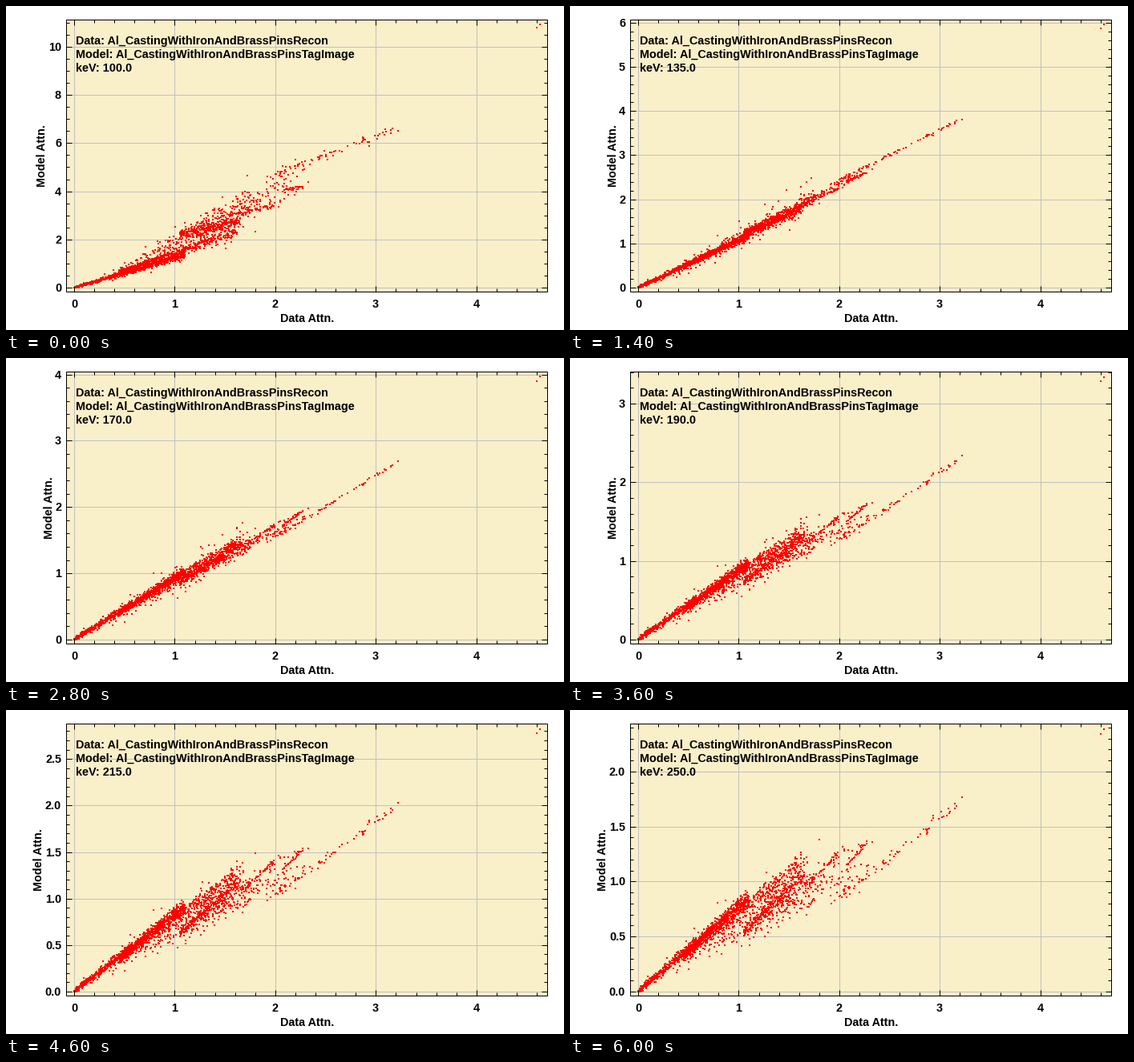
Write a matplotlib script that moves like this. It is 696 px wide and 405 px high and loops after 6200 ms.

```python
import numpy as np
import matplotlib.pyplot as plt
from matplotlib.animation import FuncAnimation
from matplotlib.collections import LineCollection
from matplotlib.patches import Rectangle

W, H, DPI = 696, 405, 100
PX = 72 / DPI
LEFT, RIGHT, TOP, BOTTOM = 75.5, 675.5, 17.5, 357.5
X0, Y0, XSCALE, PEAK_RISE = 85, 352, 125.45, 330
FRAMES, INTERVAL = 31, 200
E_MIN, E_STEP, E_MAX = 100, 5, 250

plt.rcParams["font.family"] = "Liberation Sans"
plt.rcParams["font.weight"] = "bold"

# Attenuation falls with energy: a power law for the light metal,
# a smooth log-log curve through key points for the heavy one.
peak_fit = np.polyfit(np.log([100, 135, 190, 250]),
                      np.log([10.963, 5.98, 3.356, 2.4]), 3)


def peak(e):
    return np.exp(np.polyval(peak_fit, np.log(e)))


def heavy(e):
    return peak(e) / peak(E_MAX)


def light(e):
    return (E_MAX / e) ** 0.457


def make_points():
    """Return x, value at E_MIN and value at E_MAX of every dot."""
    rng = np.random.default_rng(4)

    def draw(n, start, length, power=1.0):
        return start + length * rng.random(n) ** power

    casting = draw(800, 0, 1.1)
    mixed = draw(560, 0.45, 1.17, 1.5)
    cloud = np.clip(rng.normal(1.35, 0.42, 440), 0.3, 2.4)
    arc = draw(75, 2.05, 1.19, 1.6)
    strands = [
        (casting, rng.normal(1.22, 0.05, casting.size)),
        (mixed, rng.normal(1.43, 0.07, mixed.size)),
        (cloud, rng.normal(1.70 + 0.16 * cloud, 0.2)),
        (arc, rng.normal(2.32 - 0.24 * (arc - 2.05), 0.04)),
        (np.array([4.60, 4.63]), np.full(2, 2.367)),
    ]
    # Each pin adds a fixed thickness, so its dots climb gently.
    pins = [(1.05, 0.60, 2.2), (1.65, 0.35, 3.1), (2.05, 0.23, 4.0)]
    for k, (start, length, rise) in enumerate(pins):
        x = draw(int(230 / (k + 1) ** 2), start, length)
        strands.append((x, (rise + 0.9 * (x - start)) / x
                        + rng.normal(0, 0.06 / (k + 1), x.size)))

    x, p = np.hstack(strands)
    p = np.clip(p, 1.12, 2.42)
    q = 0.79 - 0.31 * (p - 1.2) + 0.0128 * np.maximum(x - 2, 0) ** 2

    stray = rng.random(x.size) < 0.09
    noise = np.where(x > 1.75, 0.004, np.where(stray, 0.13, 0.018))
    gain = 1 + rng.normal(0, noise)
    shift = rng.normal(0, 0.018, x.size) * (x < 1.75)
    return x, x * p * gain + 1.5 * shift, x * q * gain + shift


xs, lo, hi = make_points()
heavy_part = (lo - light(E_MIN) * hi) / (heavy(E_MIN) - light(E_MIN))
light_part = hi - heavy_part


def model(e):
    return np.maximum(light_part * light(e) + heavy_part * heavy(e), 0)


def nice_step(span):
    raw = span / 6.3
    base = 10 ** np.floor(np.log10(raw))
    return next(m * base for m in (1, 2, 5, 10) if raw <= m * base)


def crisp(v):
    return np.floor(v + 0.5) + 0.5


def h_ticks(ys, size):
    return [s for y in ys for s in ([(LEFT, y), (LEFT + size, y)],
                                    [(RIGHT - size, y), (RIGHT, y)])]


def v_ticks(cols, size):
    return [s for x in cols for s in ([(x, TOP), (x, TOP + size)],
                                      [(x, BOTTOM - size), (x, BOTTOM)])]


fig = plt.figure(figsize=(W / DPI, H / DPI), dpi=DPI, facecolor="white")
ax = fig.add_axes([0, 0, 1, 1])
ax.set_xlim(0, W)
ax.set_ylim(H, 0)
ax.axis("off")


def lines(segments, color, z):
    return ax.add_collection(LineCollection(
        segments, colors=color, linewidths=PX, zorder=z, snap=False),
        autolim=False)


def label(x, y, s, **kw):
    return ax.text(x, y, s, fontsize=14.38 * PX, va="baseline", zorder=5, **kw)


box = (LEFT, TOP), RIGHT - LEFT, BOTTOM - TOP
ax.add_patch(Rectangle(*box, fc="#f9efc9", ec="none", zorder=0, snap=False))
ax.add_patch(Rectangle(*box, fc="none", ec="black", lw=PX, zorder=4,
                       snap=False))

x_major = crisp(X0 + XSCALE * np.arange(5))
x_minor = crisp(X0 + XSCALE * np.arange(0, 4.7, 0.2))
lines([[(x, TOP), (x, BOTTOM)] for x in x_major], "#c0c0c0", 1)
lines(v_ticks(x_major, 7) + v_ticks(x_minor, 4), "black", 4)
for i, x in enumerate(x_major):
    label(x - 0.5, 377, str(i), ha="center")
label(375.5, 395, "Data Attn.", ha="center")
label(87, 48, "Data: Al_CastingWithIronAndBrassPinsRecon")
label(87, 65, "Model: Al_CastingWithIronAndBrassPinsTagImage")

energy_text = label(87, 82, "")
y_title = label(58, 187, "Model Attn.", ha="center", rotation=90,
                rotation_mode="anchor")
y_labels = [label(69, 0, "", ha="right") for _ in range(10)]
y_grid = lines([], "#c0c0c0", 1)
y_ticks = lines([], "black", 4)
dots, = ax.plot([], [], "s", color="red", ms=2 * PX, mew=0, zorder=3)


def update(i):
    e = E_MIN + E_STEP * i
    scale = PEAK_RISE / peak(e)
    top = (Y0 - TOP) / scale
    step = nice_step((BOTTOM - TOP) / scale)
    parts = 4 if round(step) == 2 else 5

    values = np.arange(0, top, step)
    major = crisp(Y0 - scale * values)
    minor = crisp(Y0 - scale * np.arange(0, top, step / parts))
    y_grid.set_segments([[(LEFT, y), (RIGHT, y)] for y in major])
    y_ticks.set_segments(h_ticks(major, 7) + h_ticks(minor, 4))

    names = [f"{v:.0f}" if step > 0.9 else f"{v:.1f}" for v in values]
    for k, t in enumerate(y_labels):
        t.set_text(names[k] if k < len(names) else "")
        if k < len(names):
            t.set_y(major[k] + 4.5)
    y_title.set_x({1: 58, 2: 49, 3: 45}[len(names[-1])])

    energy_text.set_text(f"keV: {e:.1f}")
    dots.set_data(np.round(X0 + XSCALE * xs), np.round(Y0 - scale * model(e)))
    return dots, y_grid, y_ticks, energy_text, y_title, *y_labels


anim = FuncAnimation(fig, update, frames=FRAMES, init_func=lambda: update(0),
                     interval=INTERVAL, repeat=True, repeat_delay=0, blit=False)
plt.show()
```
